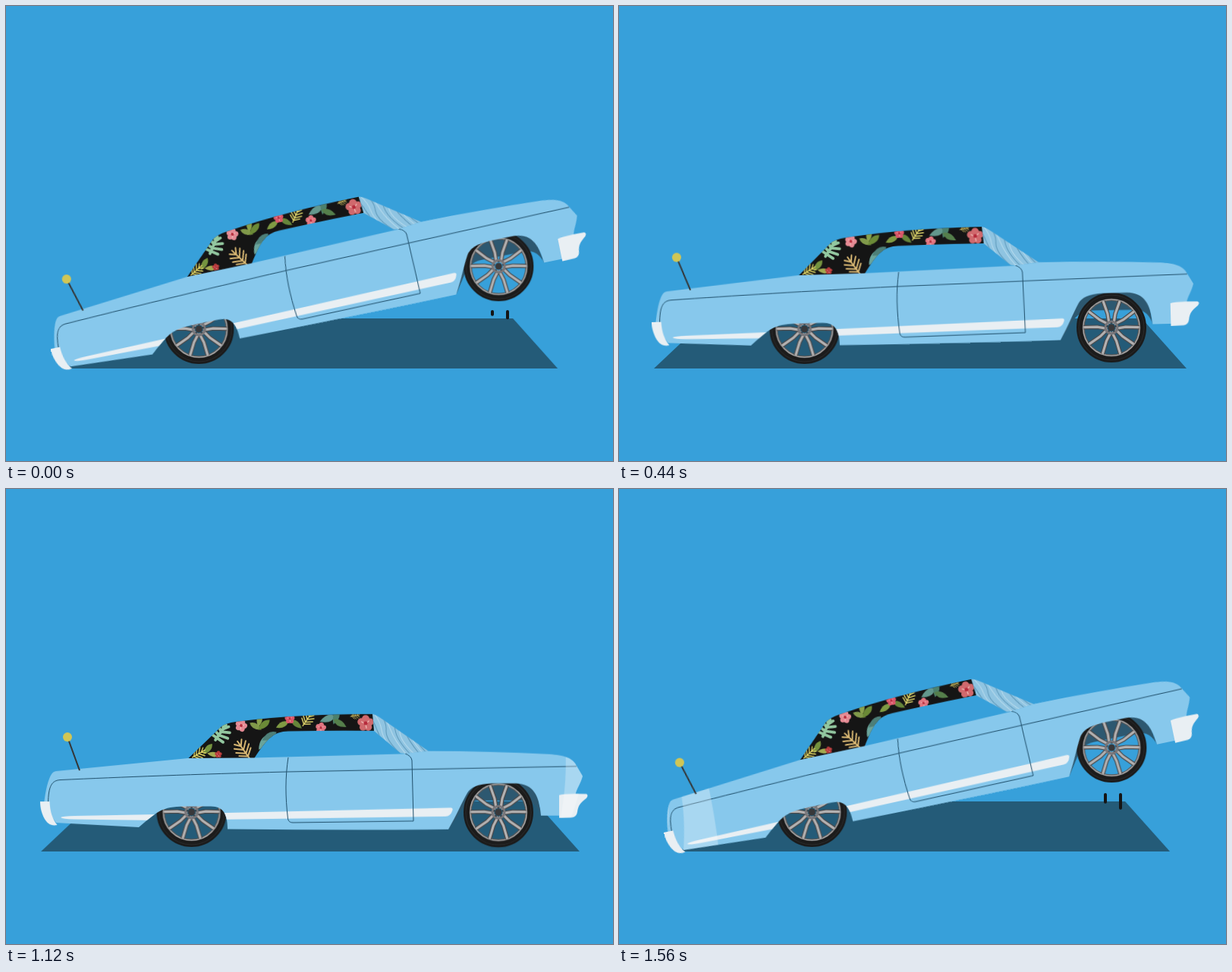
These frames come from a looping animation (800x600 px, 1.6 s). An HTML page:

```html
<!DOCTYPE html>
<html lang="en">
<head>
<meta charset="utf-8">
<title>Bouncing lowrider</title>
<style>
  html, body { margin: 0; width: 100%; height: 100%; overflow: hidden; background: #37a0da; }
  svg { display: block; width: 100vw; height: 100vh; }

  .move { animation: 1600ms linear infinite; }
  #car { transform-origin: 244px 426px; animation-name: car; }
  #antenna { transform-origin: 97px 371px; animation-name: antenna; }
  #rear { animation-name: rear; }
  #front { animation-name: front; }
  #shadowLeft { animation-name: shadowLeft; }
  #shadowRight { animation-name: shadowRight; }
  #shine { animation-name: shine; }
  #dropA { animation-name: dropA; }
  #dropB { animation-name: dropB; }

  @keyframes car {
    0% { transform: translateX(12.6px) rotate(-11.63deg); animation-timing-function: cubic-bezier(.333,.45,.667,.77); }
    10% { transform: translateX(7.7px) rotate(-5deg); animation-timing-function: cubic-bezier(.333,.75,.667,.93); }
    27.5% { transform: translateX(-1.6px) rotate(-1.43deg); animation-timing-function: ease-out; }
    35%, 37.5% { transform: translateX(-1.4px) rotate(-1.1deg); animation-timing-function: cubic-bezier(.4,.2,.7,.7); }
    47.5% { transform: translateX(-.7px) rotate(-.64deg); animation-timing-function: cubic-bezier(.333,.4,.667,1); }
    60%, 70% { transform: translateX(0) rotate(0deg); animation-timing-function: linear; }
    80% { transform: translateX(6.5px) rotate(-6.29deg); animation-timing-function: cubic-bezier(.333,.56,.667,1); }
    95% { transform: translateX(12.7px) rotate(-11.88deg); }
    97.5% { transform: translateX(12.7px) rotate(-11.79deg); }
    100% { transform: translateX(12.6px) rotate(-11.63deg); }
  }
  @keyframes antenna {
    0%, 100% { transform: rotate(4deg); }
    10% { transform: rotate(-2.1deg); }
    27.5% { transform: rotate(-1.4deg); }
    47.5% { transform: rotate(-1deg); }
    60%, 70% { transform: rotate(0deg); }
    80% { transform: rotate(2.7deg); }
    97.5% { transform: rotate(4.2deg); }
  }
  @keyframes rear {
    0%, 97.5%, 100% { transform: translate(254.3px, 426px); }
    10%, 80% { transform: translate(249.5px, 426px); animation-timing-function: ease-out; }
    27.5%, 70% { transform: translate(244.5px, 426px); }
  }
  @keyframes front {
    0% { transform: translate(649.3px, 343px); }
    10% { transform: translate(649.3px, 380.7px); animation-timing-function: cubic-bezier(.333,.5,.667,.95); }
    27.5% { transform: translate(649px, 424px); }
    35%, 37.5% { transform: translate(649px, 424.6px); }
    47.5% { transform: translate(649px, 425.5px); }
    60%, 70% { transform: translate(649px, 426.5px); }
    80% { transform: translate(649px, 392.5px) scaleY(1.22); animation-timing-function: cubic-bezier(.333,.56,.667,1); }
    97.5% { transform: translate(649.3px, 341px); }
    100% { transform: translate(649.3px, 343px); }
  }
  @keyframes shadowLeft {
    0%, 97.5%, 100% { transform: translateX(80px); }
    10%, 80% { transform: translateX(62px); animation-timing-function: ease-out; }
    27.5%, 70% { transform: translateX(46px); }
  }
  @keyframes shadowRight {
    0%, 100% { transform: translateX(727px); }
    10% { transform: translateX(744px); }
    27.5% { transform: translateX(748px); }
    37.5% { transform: translateX(748.3px); }
    47.5% { transform: translateX(750px); }
    60%, 70% { transform: translateX(756px); }
    80% { transform: translateX(740px); animation-timing-function: ease-out; }
    97.5% { transform: translateX(726px); }
  }
  @keyframes shine {
    0%, 67.5% { transform: translateX(391px); }
    92.5%, 100% { transform: translateX(-391px); }
  }
  @keyframes dropA {
    0% { y: 401px; height: 8px; }
    3.75% { y: 401px; height: 0; }
    3.8%, 77.5% { y: 467px; height: 0; }
    80% { y: 450px; height: 17px; }
    87.5% { y: 401px; height: 50px; animation-timing-function: ease-out; }
    97.5% { y: 401px; height: 14px; }
    100% { y: 401px; height: 8px; }
  }
  @keyframes dropB {
    0% { y: 401px; height: 12.5px; }
    4.5% { y: 401px; height: 0; }
    4.6%, 78.5% { y: 467px; height: 0; }
    80% { y: 462px; height: 5px; }
    88.75% { y: 401px; height: 56px; animation-timing-function: ease-out; }
    97.5% { y: 401px; height: 22px; }
    100% { y: 401px; height: 12.5px; }
  }
</style>
</head>
<body>
<svg viewBox="0 0 800 600">
  <defs>
    <path id="body" d="M66 372 L240 355 L327 354.5 L523 349.5 L557 345.8 Q640 346 716 350 C736 351.5 745 355 750 362 L760 379 C757 390 752 395 750 405 L740 431 L705 431
      C703 405 695 389 672 388.5 L640 388.5 C622 389 612 394 608 401 C600 415 594 430 583 449 Q440 450 292 448.5
      C292 430 287 418.5 270 418.5 L235 418.5 C205 419 200 425 175 446 L66 440 L50 416 C52 396 56 382 60 376 Q62 372.5 66 372Z"/>
    <path id="bumper" d="M729 404 Q736 401.5 765 402.5 Q768 404 765 408 C757 414 754 418 753 426 Q752 433 746 433.5 L729 434Z"/>
    <path id="roof" d="M240 355.5 L283 314 Q290 308.5 303 307 C365 299 425 297 483 297 L485 319 Q425 318.5 372 319.5 C353 320 345 328 327 355.5Z"/>
    <path id="glass" d="M483 297 Q488 298 495 303 L557 346 L529 349.5 L520 348.5 L485 319Z"/>
    <clipPath id="bodyClip"><use href="#body"/><use href="#bumper"/></clipPath>
    <clipPath id="paintClip"><use href="#body"/></clipPath>
    <clipPath id="roofClip"><use href="#roof"/></clipPath>
    <clipPath id="glassClip"><use href="#glass"/></clipPath>

    <g id="spoke" fill="none">
      <path d="M-3 -5 L-5 -18 L-11 -35 M3 -5 L5 -18 L11 -35" stroke="#4a4a4c" stroke-width="5.6"/>
      <path d="M-3 -5 L-5 -18 L-11 -35 M3 -5 L5 -18 L11 -35" stroke="#b3b1b1" stroke-width="3.2"/>
      <circle cy="-7" r="1.3" fill="#222"/>
    </g>
    <g id="wheel">
      <circle r="41.8" fill="none" stroke="#1b1b1b" stroke-width="8.4"/>
      <circle r="43" fill="none" stroke="#2c2c2c" stroke-width="1"/>
      <circle r="36.8" fill="none" stroke="#5a5a5a" stroke-width="3"/>
      <circle r="37.2" fill="none" stroke="#aaa8a8" stroke-width="1.3"/>
      <g id="spokes"></g>
      <circle r="8" fill="none" stroke="#77767a" stroke-width="3"/>
      <circle r="4.6" fill="#38383a"/>
    </g>

    <path id="leaf" fill="currentColor" d="M0 -10 Q8 -2 0 10 Q-8 -2 0 -10Z"/>
    <g id="palm" fill="none" stroke="currentColor" stroke-linecap="round" stroke-width="1.7">
      <path d="M0 12V-12 M0 9L-8 3 M0 9L8 3 M0 5L-9 -2 M0 5L9 -2 M0 0L-8 -7 M0 0L8 -7 M0 -5L-5 -11 M0 -5L5 -11"/>
    </g>
    <g id="monstera" fill="none" stroke="currentColor" stroke-linecap="round" stroke-width="3.4">
      <path d="M0 11V-11 M0 8L-9 8 M0 8L9 8 M0 4L-11 1 M0 4L11 1 M0 -1L-9 -6 M0 -1L9 -6 M0 -5L-4 -11 M0 -5L4 -11"/>
    </g>
    <g id="flower">
      <g fill="currentColor">
        <circle cy="-5" r="4.4"/><circle cx="5" cy="-1.5" r="4.2"/><circle cx="3" cy="4.5" r="4.2"/>
        <circle cx="-3" cy="4.5" r="4"/><circle cx="-5" cy="-1.5" r="4.3"/>
      </g>
      <path d="M0 1 L-5 -2 M0 1 L4 -3 M0 1 L1 6" stroke="#f3c3bd" stroke-width="1"/>
      <circle r="2.2" fill="#b52a3b"/>
    </g>
  </defs>

  <rect width="800" height="600" fill="#37a0da"/>
  <g fill="#245b78">
    <path id="shadowLeft" class="move" d="M0 478 L70 412 H400 V478Z"/>
    <path id="shadowRight" class="move" d="M0 478 L-59 412 H-420 V478Z"/>
  </g>
  <g fill="#151515">
    <rect id="dropA" class="move" x="639" width="4" rx="2"/>
    <rect id="dropB" class="move" x="659" width="4" rx="2"/>
  </g>

  <!-- inner front arch, behind the wheel -->
  <g class="move" id="archHolder">
    <path fill="#2d5870" d="M583 449 L606 395 L640 386 H680 L700 398 L705 431 C702 420 695 412 684 411.5 L624 411 Q608 411 598 427Z"/>
  </g>
  <use id="rear" class="move" href="#wheel"/>
  <use id="front" class="move" href="#wheel"/>

  <g id="car" class="move">
    <use href="#glass" fill="#8fc4e1"/>
    <g id="streaks" clip-path="url(#glassClip)" fill="none" stroke-width="1.1"></g>
    <use href="#roof" fill="#151515"/>
    <g id="print" clip-path="url(#roofClip)"></g>

    <use href="#body" fill="#87c8ec"/>
    <g clip-path="url(#paintClip)">
      <path fill="#e9eff3" d="M72 433 Q74 431.5 90 431 L200 429 L586 420.5 Q590 420.5 588 425 Q586 431.5 579 432 L200 437 L90 435.5 Q74 435 72 433Z"/>
      <g fill="none" stroke="#1f4f6b" stroke-width="1">
        <path d="M55.500 414 C56 392 60 384 72 383.500 C150 380 250 376 370 373 L752 366"/>
        <path d="M372 354 C368 380 368 405 371.500 435 Q372.500 440 378 440 L537 438 L535 358 Q534 352 526 349"/>
      </g>
    </g>
    <use href="#bumper" fill="#e9eff3"/>
    <path fill="#e9eff3" d="M45 412 L57.500 412 C58 425 61 435 67.500 443 Q58 445 53 438 C47 430 45 420 45 412Z"/>
    <g clip-path="url(#bodyClip)">
      <g id="shine" class="move" fill="#fff" fill-opacity=".27">
        <path d="M426.500 345 Q429 396 416 453 H426 Q449 400 455 345Z"/>
        <path d="M469 345 Q471 394 453 453 H502 Q507 405 506 345Z"/>
      </g>
    </g>
    <g id="antenna" class="move">
      <path d="M97 371 L81 327" stroke="#333" stroke-width="2"/>
      <circle cx="81" cy="327" r="6" fill="#d0c655"/>
    </g>
  </g>
</svg>

<script>
  const SVG = 'http://www.w3.org/2000/svg';
  const byId = id => document.getElementById(id);

  function add(parent, tag, attributes) {
    const node = document.createElementNS(SVG, tag);
    for (const [name, value] of Object.entries(attributes)) node.setAttribute(name, value);
    byId(parent).append(node);
  }

  // The arch shares the body's motion but sits below the wheels.
  Object.assign(byId('archHolder').style, { animationName: 'car', transformOrigin: '244px 426px' });

  for (let i = 0; i < 5; i++) add('spokes', 'use', { href: '#spoke', transform: `rotate(${i * 72})` });

  for (let i = 0; i < 16; i++) {
    add('streaks', 'path', {
      d: `M${456 + i * 6} 290 q${10 + i % 3 * 3} 14 15 28 t22 34`,
      stroke: i % 2 ? '#5f9abb' : '#b4d9ec'
    });
  }

  // shape, x, y, scale, rotation, colour
  const print = [
    ['leaf', 266, 343, .9, 40, '#75933f'],
    ['leaf', 273, 350, .8, 100, '#a3a950'],
    ['palm', 254, 349, .8, 60, '#d9cf62'],
    ['flower', 280, 350, .5, 0, '#b63a3a'],
    ['monstera', 283, 321, 1.1, 35, '#93c8a0'],
    ['palm', 313, 344, 1.15, -35, '#d9b873'],
    ['leaf', 340, 334, 1.2, 35, '#6aa49b'],
    ['leaf', 347, 326, 1.1, 60, '#4d7f78'],
    ['flower', 310, 312, .85, 20, '#e58a94'],
    ['leaf', 329, 313, .9, -60, '#80994a'],
    ['leaf', 340, 311, 1, 50, '#6b8a37'],
    ['leaf', 334, 305, .9, 10, '#8aa24d'],
    ['leaf', 364, 311, .9, 65, '#7f9a43'],
    ['leaf', 383, 310, .9, -50, '#66853a'],
    ['flower', 374, 303, .7, 0, '#d9576a'],
    ['palm', 397, 304, .85, 35, '#d8cf68'],
    ['flower', 415, 315, .75, 10, '#e27580'],
    ['leaf', 424, 303, 1.1, 70, '#63978d'],
    ['leaf', 435, 301, 1, 20, '#4c806c'],
    ['leaf', 440, 309, 1, -60, '#557f4b'],
    ['palm', 460, 299, .5, 80, '#cfbf62'],
    ['flower', 474, 309, 1.15, 0, '#d0696d']
  ];
  for (const [shape, x, y, scale, turn, color] of print) {
    add('print', 'use', { href: '#' + shape, color, transform: `translate(${x} ${y}) rotate(${turn}) scale(${scale})` });
  }
</script>
</body>
</html>
```
